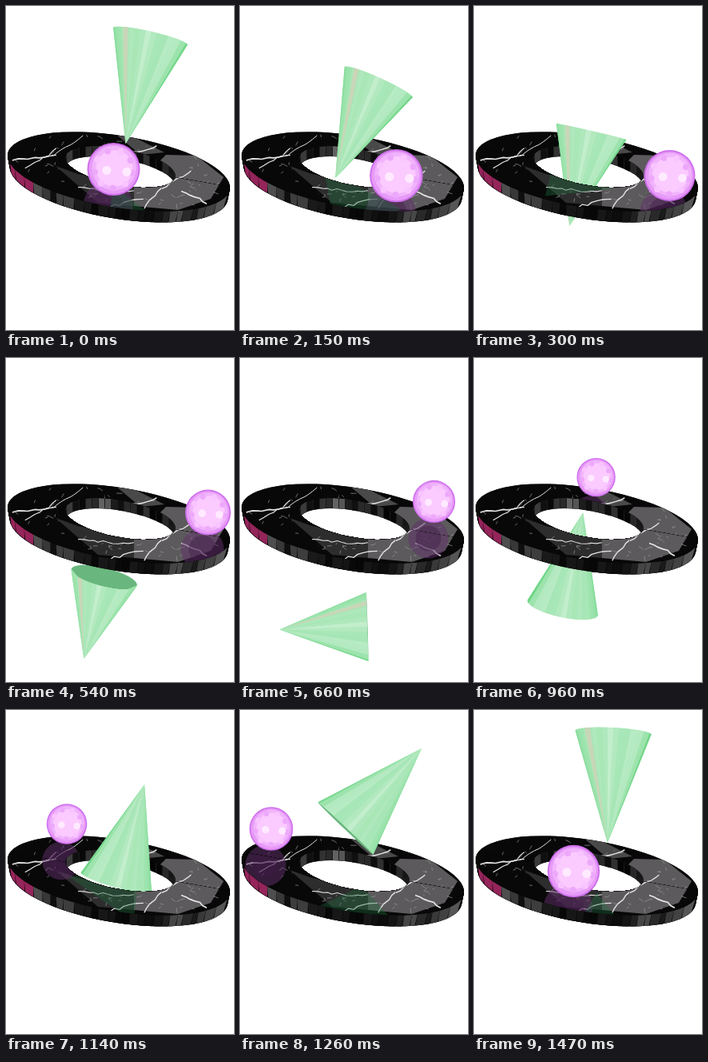
An HTML page with a canvas that plays this animation: 285x405 px, repeating every 1500 ms.

```html
<!DOCTYPE html>
<html>
<head>
<meta charset="utf-8">
<style>
html, body { margin: 0; width: 100%; height: 100%; overflow: hidden; background: #fff; }
canvas { display: block; }
</style>
</head>
<body>
<canvas width="285" height="405"></canvas>
<script>
const ctx = document.querySelector('canvas').getContext('2d');
const LOOP = 1500, STEP = 30, THICK = 14;

// time, x, y, radius
const ballKeys = [
  [0, 134.5, 204, 33], [300, 244.5, 212, 32], [540, 252.5, 193, 28.5], [780, 221, 166, 25],
  [1140, 76, 142.5, 25.3], [1260, 39, 148.5, 27.3], [1470, 124.5, 201.5, 32.7]
];
// time, x, y, heading, length
const coneKeys = [
  [0, 165, 105, 193, 138], [300, 133, 216, 193, 121], [540, 110, 325, 194, 105],
  [780, 104.5, 325.5, 348, 118], [1140, 155.5, 154.5, 376, 128],
  [1260, 179.5, 98, 403.5, 138], [1470, 170.5, 97, 543, 138]
];

function keyAt(keys, i, turn) {
  const n = keys.length, lap = Math.floor(i / n);
  return keys[i - lap * n].map((v, c) => v + lap * (c === 0 ? LOOP : c === turn ? 360 : 0));
}

// Cyclic cubic through unevenly spaced keys
function sample(keys, t, turn) {
  let i = keys.length - 1;
  while (keys[i][0] > t) i--;
  const [a, b, c, d] = [-1, 0, 1, 2].map(k => keyAt(keys, i + k, turn));
  const span = c[0] - b[0], s = (t - b[0]) / span;
  const slope = (p, q, r, k) => {
    const h = q[0] - p[0], g = r[0] - q[0];
    return ((q[k] - p[k]) / h * g + (r[k] - q[k]) / g * h) / (h + g);
  };
  return b.slice(1).map((v, j) => {
    const k = j + 1, m0 = slope(a, b, c, k) * span, m1 = slope(b, c, d, k) * span;
    return v + s * m0 + s * s * (3 * (c[k] - v) - 2 * m0 - m1)
      + s * s * s * (2 * (v - c[k]) + m0 + m1);
  });
}

function seeded(seed) {
  return () => (seed = seed * 16807 % 2147483647) / 2147483647;
}
const grey = v => `rgb(${v},${v},${v})`;

function ovals(...list) {
  const p = new Path2D();
  for (const [x, y, rx, ry, rot] of list) {
    p.moveTo(x + rx * Math.cos(rot), y + rx * Math.sin(rot));
    p.ellipse(x, y, rx, ry, rot, 0, 7);
  }
  return p;
}
function trace(points) {
  ctx.beginPath();
  for (const [x, y] of points) ctx.lineTo(x, y);
}
function poly(points, fill) {
  trace(points);
  ctx.fillStyle = fill;
  ctx.fill();
}
function disc(x, y, r, fill) {
  ctx.fillStyle = fill;
  ctx.fill(ovals([x, y, r, r, 0]));
}
function scoped(draw) { ctx.save(); draw(); ctx.restore(); }

const outer = d => [141, 207 + d, 140.6 - 0.2 * d, 44.8, 0.159];
const hole = d => [143, 201 + d, 70, 23, 0.185];
const topFace = ovals(outer(0), hole(0));

function rimPoint(x, d) {
  const u = (x - 141) / 139;
  return [x - u * 0.2 * d, 207 + 20 * u + 45.3 * Math.sqrt(1 - u * u) + d];
}

// Jagged line between two points
function crack(x1, y1, x2, y2, random) {
  const steps = Math.ceil(Math.hypot(x2 - x1, y2 - y1) / 7);
  return Array.from({ length: steps + 1 }, (_, i) => [
    x1 + (x2 - x1) * i / steps + 3 * (random() - 0.5),
    y1 + (y2 - y1) * i / steps + 3 * (random() - 0.5)
  ]);
}

function drawRim(random) {
  ctx.fillStyle = '#040404';
  for (let d = THICK; d >= 0; d--) ctx.fill(ovals(outer(d), hole(0)), 'evenodd');
  for (let x = 5; x < 270;) {
    const end = x + 6 + 8 * random();
    const middle = x > 75 && x < 190;
    const color = x < 25 ? '#95245a' : grey((middle ? 30 : 90) * random());
    poly([rimPoint(x, 0), rimPoint(end, 0), rimPoint(end - 2, THICK), rimPoint(x - 1, THICK)], color);
    x = end;
  }
}

function drawInnerWall(random) {
  scoped(() => {
    ctx.clip(ovals(hole(0)));
    ctx.clip(ovals(hole(0), hole(13)), 'evenodd');
    ctx.fillStyle = '#1a1a1a';
    ctx.fillRect(60, 160, 160, 70);
    for (let x = 76; x < 210; x += 8) {
      ctx.fillStyle = grey((x < 135 ? 100 : 50) * random());
      ctx.fillRect(x, 170, 7, 40);
    }
  });
}

function drawMarble(random) {
  scoped(() => {
    ctx.clip(topFace, 'evenodd');
    ctx.fillStyle = '#080808';
    ctx.fillRect(0, 150, 285, 120);
    poly([[200, 186], [238, 187], [272, 214], [256, 241], [215, 255], [160, 250], [160, 226]], '#5c5a5c');
    poly([[137, 160], [158, 163], [198, 183], [168, 186]], '#4a494a');
    poly([[62, 200], [90, 210], [160, 224], [160, 250], [115, 246]], '#2e2d2e');

    ctx.strokeStyle = '#e4e4e4';
    const veins = [
      [8, 192, 62, 187], [24, 204, 64, 179], [54, 189, 96, 163], [154, 184, 189, 176],
      [90, 228, 160, 232], [130, 251, 172, 240], [172, 252, 194, 228], [194, 228, 232, 206],
      [219, 233, 252, 246]
    ];
    for (const vein of veins) {
      ctx.lineWidth = 0.8 + random();
      trace(crack(...vein, random));
      ctx.stroke();
    }
    ctx.strokeStyle = '#999';
    ctx.lineWidth = 0.7;
    for (let i = 0; i < 60; i++) {
      const a = 6.28 * random(), k = 0.6 + 0.38 * random();
      const x = 141 + 137 * k * Math.cos(a), y = 205 + 47 * k * Math.sin(a + 0.42);
      trace(crack(x, y, x + 7 * random(), y + 8 * (random() - 0.5), random));
      ctx.stroke();
    }
  });
}

function drawRing() {
  const random = seeded(4711);
  drawRim(random);
  drawInnerWall(random);
  drawMarble(random);
}

function drawReflections([x, y, r], cone) {
  scoped(() => {
    ctx.clip(topFace, 'evenodd');
    disc(x - 7, y + 46, r * 0.94, 'rgba(98,48,108,.5)');
    disc(x - 7, y + 46, r * 0.6, 'rgba(60,25,68,.4)');
    if (cone[1] < 235) {
      ctx.globalAlpha = 0.38;
      ctx.transform(1, 0, 0, -0.5, -14, 311);
      drawCone(cone, '#1d6a3c');
    }
  });
}

function drawCone([x, y, heading, length], flat) {
  const angle = heading * Math.PI / 180, h = length / 2, w = 25.5 + 0.16 * length;
  // the base opens towards the viewer below eye level
  const baseY = y + h * Math.cos(angle);
  const opening = -Math.cos(angle) * Math.max(-6, Math.min(12, (baseY - 165) * 0.12));
  const wedge = (a, b, color) => {
    const points = [[0, -h]];
    for (let i = 0; i <= 8; i++) {
      const u = a + (b - a) * i / 8;
      points.push([u * w, h - opening * Math.sqrt(Math.max(0, 1 - u * u))]);
    }
    poly(points, color);
  };
  scoped(() => {
    ctx.translate(x, y);
    ctx.rotate(angle);
    if (opening > 0) {
      ctx.fillStyle = flat || '#69b77e';
      ctx.fill(ovals([0, h, w, opening, 0]));
    }
    wedge(-1, 1, flat || '#a2e3b0');
    if (flat) return;
    const random = seeded(99), n = 20;
    for (let i = 0; i < n; i++) {
      const a = -Math.cos(Math.PI * i / n), b = -Math.cos(Math.PI * (i + 1) / n);
      const light = 76 + 9 * random() - 16 * Math.abs(a + b) ** 8 / 256;
      wedge(a, b, `hsl(134,56%,${light}%)`);
    }
    if (Math.cos(angle) < 0) wedge(0.62, 0.76, '#c9d6b8');
  });
}

function drawBall([x, y, r]) {
  const spot = (dx, dy, k, color) => disc(x + dx * r, y + dy * r, k * r, color);
  spot(0, 0, 1, '#cf70ec');
  spot(0, 0, 0.94, '#e79af8');
  spot(0.02, -0.04, 0.84, '#f1b4fc');
  spot(0.03, -0.03, 0.7, '#fbcaff');
  for (let i = 0; i < 9; i++) {
    const a = i * 0.7 + 0.2;
    spot(0.72 * Math.cos(a), 0.72 * Math.sin(a), 0.12, i % 2 ? '#f9c4ff' : '#eda8fb');
  }
  spot(-0.26, 0.04, 0.17, '#ffeaff');
  spot(0.5, 0.1, 0.17, '#ffeaff');
}

function frame() {
  const t = Math.floor(performance.now() % LOOP / STEP) * STEP;
  const ball = sample(ballKeys, t), cone = sample(coneKeys, t, 3);
  const behind = t > 700 && t < 1300;
  ctx.clearRect(0, 0, 285, 405);
  drawRing();
  drawReflections(ball, cone);
  if (behind) drawBall(ball);
  drawCone(cone);
  // the near half of the ring covers whatever passes through the hole
  scoped(() => {
    trace([[0, 177], [285, 227], [285, 300], [0, 300]]);
    ctx.clip();
    drawRing();
    drawReflections(ball, cone);
  });
  if (!behind) drawBall(ball);
  requestAnimationFrame(frame);
}
frame();
</script>
</body>
</html>
```
